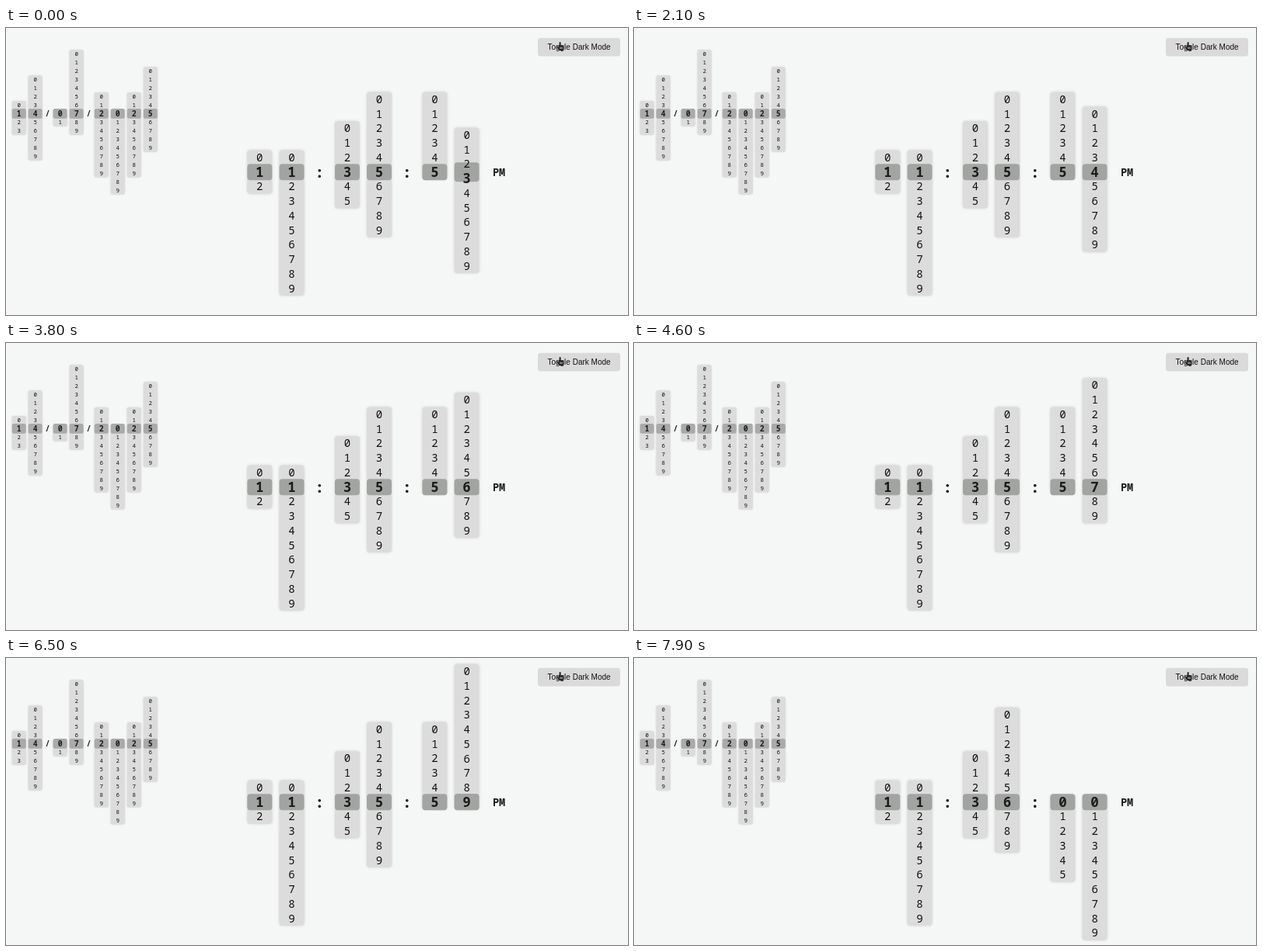
An HTML page with a canvas for the animation above (8 s loop, 800x370 px).

```html
<!DOCTYPE html>
<html lang="en">
<head>
<meta charset="utf-8">
<title>Rolling column clock</title>
<style>
html, body { margin: 0; width: 100%; height: 100%; overflow: hidden; background: #f5f7f6; }
canvas { display: block; }
</style>
</head>
<body>
<canvas id="stage" width="800" height="370"></canvas>
<script>
const ctx = document.getElementById('stage').getContext('2d');
const LOOP = 8000, ROLL = 300;
const MONO = '"Noto Sans Mono", monospace';
// Moments at which the seconds become 53, 54, ... 59, 00
const TICKS = [-95, 1250, 2250, 3250, 4250, 5250, 6250, 7610];

const TIME = { y: 185.7, pitch: 18.75, width: 32, mark: 21, radius: 4, size: 14, big: 17.5, markColor: '#a2a4a2' };
const DATE = { y: 110.4, pitch: 10.95, width: 18, mark: 12.6, radius: 2.5, size: 7.4, big: 9.8, markColor: '#a9aaa9' };

// The CSS "ease" curve, solved by bisection
function ease(x) {
  if (x <= 0) return 0;
  if (x >= 1) return 1;
  const bezier = (a, b, s) => 3 * a * s * (1 - s) ** 2 + 3 * b * s * s * (1 - s) + s ** 3;
  let lo = 0, hi = 1;
  for (let i = 0; i < 20; i++) {
    const mid = (lo + hi) / 2;
    if (bezier(.25, .25, mid) < x) lo = mid; else hi = mid;
  }
  return bezier(.1, 1, lo);
}

function box(x, y, w, h, radius, color) {
  ctx.fillStyle = color;
  ctx.beginPath();
  ctx.roundRect(x, y, w, h, radius);
  ctx.fill();
}

function label(text, x, y, font, color = '#111') {
  ctx.font = font;
  ctx.fillStyle = color;
  ctx.textAlign = 'center';
  ctx.textBaseline = 'alphabetic';
  ctx.fillText(text, x, y);
}

function monoLabel(text, x, y, size, bold) {
  label(text, x, y + size * .357, `${bold ? 'bold ' : ''}${size}px ${MONO}`, bold ? '#1c1c1c' : '#111');
}

// A strip of digits 0..last, rolled so that `position` lies on the middle line
function column(style, x, last, active, position = active) {
  const { y, pitch, width, mark, radius } = style;
  const left = x - width / 2;
  const top = y - (position + .5) * pitch;
  ctx.shadowColor = 'rgba(0,0,0,.14)';
  ctx.shadowBlur = pitch / 5;
  box(left, top, width, (last + 1) * pitch, radius, '#dcdcdc');
  ctx.shadowColor = 'transparent';

  const moving = Math.min(1, Math.abs(active - position));
  const height = mark + 4 * Math.sin(Math.PI * moving);
  box(left, y - height / 2, width, height, radius, style.markColor);

  for (let digit = 0; digit <= last; digit++) {
    const bold = digit === active;
    monoLabel(digit, x, y + (digit - position) * pitch, bold ? style.big : style.size, bold);
  }
}

function rollingColumn(x, last, from, to, progress) {
  column(TIME, x, last, progress > 0 ? to : from, from + (to - from) * progress);
}

function drawDate() {
  [[16.7, 3, 1], [37.6, 9, 4], [69.6, 1, 0], [90.6, 9, 7],
   [122.7, 9, 2], [143.7, 9, 0], [164.7, 9, 2], [185.8, 9, 5]]
    .forEach(([x, last, value]) => column(DATE, x, last, value));
  monoLabel('/', 53.6, DATE.y, 10, true);
  monoLabel('/', 106.6, DATE.y, 10, true);
}

function drawTime(t) {
  const index = TICKS.findLastIndex(tick => tick <= t);
  const progress = ease((t - TICKS[index]) / ROLL);
  const minuteTurn = index === TICKS.length - 1;
  const carry = minuteTurn ? progress : 0;

  column(TIME, 326.3, 2, 1);
  column(TIME, 367.5, 9, 1);
  column(TIME, 438.9, 5, 3);
  rollingColumn(480, 9, 5, 6, carry);
  rollingColumn(551.4, 5, 5, 0, carry);
  rollingColumn(592.6, 9, index + 2, minuteTurn ? 0 : index + 3, progress);

  monoLabel(':', 403.2, 186, 20, true);
  monoLabel(':', 515.7, 186, 20, true);
  monoLabel('PM', 634, 186, 13.5, true);
}

function drawHand() {
  ctx.fillStyle = '#222';
  ctx.beginPath();
  ctx.roundRect(711.6, 18, 2, 8, 1);
  ctx.roundRect(710.6, 22.5, 6.6, 6.5, 2);
  ctx.fill();
  ctx.strokeStyle = '#222';
  ctx.lineWidth = 1.5;
  ctx.beginPath();
  ctx.moveTo(708.8, 23.8);
  ctx.lineTo(711.5, 27.5);
  ctx.stroke();
  ctx.fillStyle = '#d8d8d8';
  ctx.fillRect(712.5, 24.5, 1, 2.5);
  ctx.fillRect(714.5, 24.5, 1, 2.5);
}

function drawButton() {
  box(684, 12.8, 106, 23.6, 3.5, '#dadada');
  label('Toggle Dark Mode', 737, 28.2, '10px "Liberation Sans", Arial, sans-serif');
  drawHand();
}

function frame(now) {
  ctx.fillStyle = '#f5f7f6';
  ctx.fillRect(0, 0, 800, 370);
  drawDate();
  drawTime(now % LOOP);
  drawButton();
  requestAnimationFrame(frame);
}
requestAnimationFrame(frame);
</script>
</body>
</html>
```
